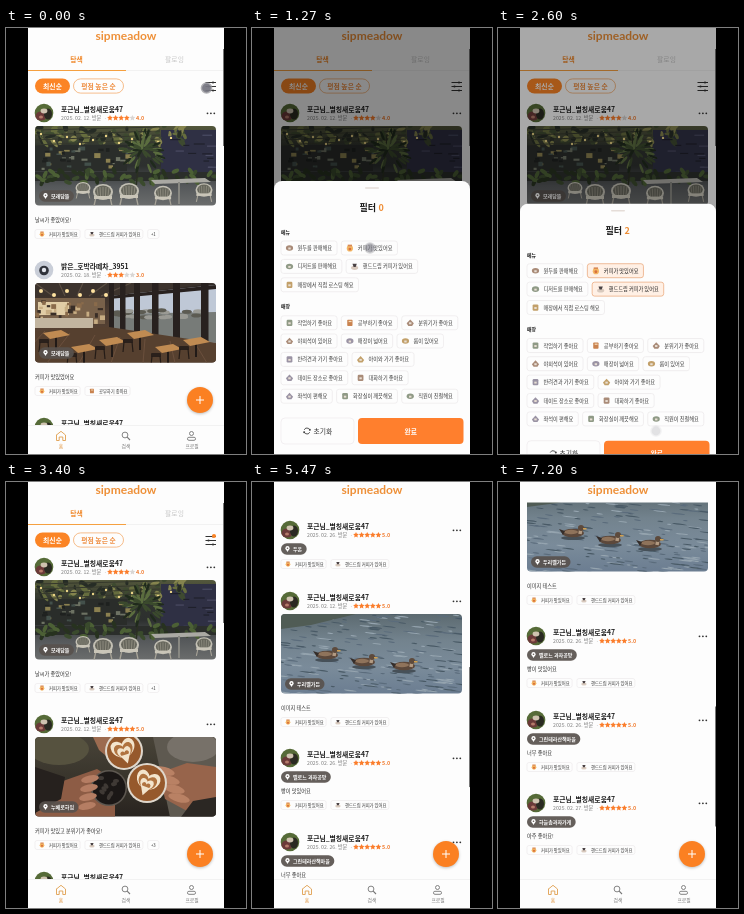
Recreate the animation shown at these times as an HTML page with a canvas. Size 240 by 426 pixels, loop 7270 ms.

```html
<!DOCTYPE html>
<html lang="ko">
<head>
<meta charset="utf-8">
<title>Cafe feed</title>
<style>
html, body { margin: 0; width: 100%; height: 100%; overflow: hidden; background: #000; }
canvas { display: block; width: 240px; height: 426px; }
</style>
</head>
<body>
<canvas id="stage"></canvas>
<script>
const W = 240, H = 426, LOOP = 7270;
const canvas = document.getElementById('stage');
const c = canvas.getContext('2d');
const dpr = window.devicePixelRatio || 1;
canvas.width = W * dpr;
canvas.height = H * dpr;

const FONT = '"Noto Sans CJK KR", "Noto Sans CJK", "Noto Sans", sans-serif';
const ORANGE = '#fb8425', INK = '#1c1c1c', GRAY = '#7d7d7d', LINE = '#ebe8ea', PAPER = '#fdfdfd';

// ---------- helpers ----------
const clamp = (v) => Math.max(0, Math.min(1, v));
const ramp = (t, start, dur) => clamp((t - start) / dur);
const easeOut = (p) => 1 - Math.pow(1 - p, 3);
const easeIn = (p) => p * p;

function seeded(s) {
  return () => (s = (s * 16807) % 2147483647) / 2147483647;
}
function setFont(size, weight = 400, family = FONT) {
  c.font = `${weight} ${size}px ${family}`;
}
function text(str, x, y, size, color = INK, weight = 400, align = 'left') {
  setFont(size, weight);
  c.textAlign = align;
  c.fillStyle = color;
  c.fillText(str, x, y);
}
function measure(str, size, weight = 400) {
  setFont(size, weight);
  return c.measureText(str).width;
}
function rect(x, y, w, h, color) {
  c.fillStyle = color;
  c.fillRect(x, y, w, h);
}
function box(x, y, w, h, r, fill, stroke, lw = 0.7) {
  c.beginPath();
  c.roundRect(x, y, w, h, r);
  if (fill) { c.fillStyle = fill; c.fill(); }
  if (stroke) { c.strokeStyle = stroke; c.lineWidth = lw; c.stroke(); }
}
function oval(x, y, rx, ry, color, rot = 0) {
  c.beginPath();
  c.ellipse(x, y, rx, ry, rot, 0, 7);
  c.fillStyle = color;
  c.fill();
}
const dot = (x, y, r, color) => oval(x, y, r, r, color);
function path(points, color, lw) {
  c.beginPath();
  points.forEach(([x, y], i) => i ? c.lineTo(x, y) : c.moveTo(x, y));
  if (lw) { c.strokeStyle = color; c.lineWidth = lw; c.stroke(); }
  else { c.fillStyle = color; c.fill(); }
}
function shade(h, ...colors) {
  const g = c.createLinearGradient(0, 0, 0, h);
  colors.forEach((k, i) => g.addColorStop(i / (colors.length - 1), k));
  return g;
}
function star(x, y, r, color) {
  const pts = [];
  for (let i = 0; i < 10; i++) {
    const a = i * Math.PI / 5 - Math.PI / 2, k = i % 2 ? r * 0.48 : r;
    pts.push([x + k * Math.cos(a), y + k * Math.sin(a)]);
  }
  path(pts, color);
}

// ---------- photos, drawn in a 181 x 80 box ----------
function chair(x, y, s = 1) {
  c.save();
  c.translate(x, y);
  c.scale(s, s);
  path([[-7, 5], [-9, 14]], '#a8a498', 1.3);
  path([[7, 5], [9, 14]], '#a8a498', 1.3);
  oval(0, 0, 10, 8, '#c3c0b4');
  oval(0, -0.5, 8, 6, '#66665c');
  for (let i = -2; i < 3; i++) path([[i * 3, -5], [i * 2.4, 5]], '#9c9a8c', 0.7);
  rect(-9, 4, 18, 3, '#c9c5b8');
  c.restore();
}
function terrace() {
  rect(0, 0, 181, 80, shade(80, '#54583c', '#30342e', '#2d302f', '#55585a', '#6b6d6d'));
  rect(126, 4, 55, 46, '#2f3044');
  rect(0, 19, 92, 26, '#2a2d2a');
  const rnd = seeded(41);
  for (let i = 0; i < 80; i++) {
    oval(rnd() * 150, rnd() * 17, 2 + rnd() * 4, 1 + rnd() * 2,
      ['#666d3e', '#3e4a30', '#262c25', '#85844e'][i % 4], rnd() * 3);
  }
  for (let i = 0; i < 4; i++) path([[0, 4 + i * 5], [125, 1 + i * 4]], '#35382c', 1);
  for (let i = 0; i < 11; i++) dot(6 + i * 13, 8 + (i * 7) % 11, 1.2, '#ecd488');
  for (let i = 0; i < 40; i++) {
    rect(rnd() * 95, 20 + rnd() * 24, 2 + rnd() * 5, 1 + rnd() * 4, ['#6d7263', '#1e211f', '#8b8050', '#43504b'][i % 4]);
  }
  for (let i = 0; i < 14; i++) rect(128 + rnd() * 50, 8 + rnd() * 38, 3 + rnd() * 8, 1.2, i % 2 ? '#4a4b63' : '#1f202b');
  rect(0, 46, 181, 9, '#2b2e2b');
  for (let i = 0; i < 55; i++) oval(rnd() * 181, 44 + rnd() * 13, 4, 2, ['#4c6035', '#27321f', '#3a4a2d'][i % 3], rnd() * 3);
  path([[101, 62], [106, 8]], '#2b3022', 1.5);
  for (let i = 0; i < 46; i++) {
    const a = rnd() * 6.3, r = 4 + rnd() * 17;
    oval(107 + Math.cos(a) * r, 23 + Math.sin(a) * r, 5, 1.3, ['#5b6d3f', '#1f2a1c', '#3b4a2d'][i % 3], a);
  }
  path([[116, 54], [170, 52], [176, 56], [120, 58]], '#aaa9a3');
  rect(143, 56, 2, 22, '#888882');
  chair(48, 62, 0.75); chair(68, 66); chair(94, 65); chair(128, 67, 0.9); chair(169, 64, 0.85);
}
function hall() {
  rect(0, 0, 181, 80, shade(80, '#302a27', '#4a3b31', '#5a4333', '#3b2b22'));
  path([[0, 0], [181, 0], [72, 13], [0, 12]], '#3c332d');
  for (let i = 0; i < 5; i++) path([[i * 24, 0], [i * 12 + 18, 13]], '#5d5044', 1.1);
  rect(0, 15, 70, 26, '#78614a');
  rect(3, 19, 31, 13, '#e1cda6');
  const rnd = seeded(29);
  for (let i = 0; i < 34; i++) rect(rnd() * 66, 17 + rnd() * 20, 2 + rnd() * 4, 2 + rnd() * 3, ['#392e27', '#c7ad83', '#8a6b4b'][i % 3]);
  rect(0, 35, 58, 10, '#c2b5a0');
  for (let i = 0; i < 6; i++) dot(6 + i * 13, 8 + i % 2 * 4, 2, '#ffe3a0');
  path([[74, 13], [181, 2], [181, 60], [74, 46]], '#bfc8d6');
  path([[74, 31], [181, 29], [181, 60], [74, 46]], '#777b78');
  for (let i = 0; i < 24; i++) oval(80 + rnd() * 101, 27 + rnd() * 8, 5, 2, i % 2 ? '#5c5b52' : '#9a9a94');
  [74, 85, 99, 117, 138, 166].forEach((x, i) => rect(x, 0, 5 + i * 0.5, 62, '#28211f'));
  path([[74, 13], [181, 2], [181, 6], [74, 16]], '#28211f');
  path([[0, 80], [0, 48], [74, 44], [181, 60], [181, 80]], '#56402f');
  for (let i = 0; i < 7; i++) path([[10 + i * 25, 48 + i * 2], [i * 32 - 20, 80]], '#705340', 0.8);
  for (let i = 0; i < 6; i++) {
    const x = 8 + i * 28, y = 50 + (i * 2 % 3) * 7;
    rect(x + 12, y + 3, 2, 14, '#211a17');
    path([[x, y], [x + 18, y - 3], [x + 27, y + 2], [x + 7, y + 6]], '#c08b52');
    box(x - 4, y + 6, 10, 4, 1, '#2a201b');
    path([[x - 3, y + 9], [x - 4, y + 19]], '#241b17', 1.2);
    path([[x + 5, y + 9], [x + 6, y + 19]], '#241b17', 1.2);
  }
}
function latte(x, y, r, a) {
  dot(x, y, r, '#dfd7cc');
  dot(x, y, r - 2, '#96592c');
  c.save();
  c.translate(x, y);
  c.rotate(a);
  for (let i = 0; i < 4; i++) {
    const s = 12 - i * 2.6, oy = i * 2 - 1;
    const tone = i % 2 ? '#b07340' : '#f3e4cc';
    oval(-s * 0.4, oy - 2, s * 0.55, s * 0.75, tone, -0.5);
    oval(s * 0.4, oy - 2, s * 0.55, s * 0.75, tone, 0.5);
  }
  path([[-5, 4], [5, 4], [0, 13]], '#f3e4cc');
  c.restore();
}
function cups() {
  rect(0, 0, 181, 80, shade(80, '#484338', '#39352c', '#28231f'));
  path([[118, 0], [181, 0], [181, 80], [135, 80]], '#5e5950');
  oval(24, 12, 30, 16, '#56523f');
  oval(158, 10, 26, 15, '#777169');
  path([[0, 80], [4, 58], [28, 44], [62, 32], [80, 44], [80, 80]], '#8d5c45');
  path([[0, 30], [30, 40], [26, 62], [0, 76]], '#26211e');
  path([[58, 0], [76, 0], [100, 14], [82, 28], [64, 13]], '#9c6b50');
  path([[181, 30], [152, 26], [124, 36], [130, 62], [152, 74], [181, 62]], '#97644b');
  path([[181, 60], [158, 64], [146, 80], [181, 80]], '#2b2723');
  for (let i = 0; i < 4; i++) oval(129 + i * 5, 34 + i * 9, 11, 4, '#b98164', 0.25);
  latte(89, 14, 19, -0.3);
  latte(112, 46, 20, 0.35);
  dot(74, 51, 18, '#5e5851');
  dot(74, 51, 16.5, '#1b1716');
  for (let i = 0; i < 8; i++) oval(66 + i * 5 % 17, 41 + i * 8 % 21, 3, 2, '#3f3935', i);
  for (let i = 0; i < 4; i++) oval(55 - i, 42 + i * 9, 9, 3.6, '#b57d63', -0.2);
}
function bun(x, y, r) {
  oval(x, y + 2, r, r * 0.8, '#654231');
  oval(x, y - 1, r * 0.95, r * 0.74, '#96603b');
  oval(x - 3, y - 3, r * 0.42, r * 0.28, '#d2a477', 0.5);
  oval(x + 4, y + 1, r * 0.32, r * 0.25, '#7b4a30');
}
function bread() {
  rect(0, 0, 181, 80, shade(80, '#b7b0aa', '#aea7a0', '#a29a93'));
  path([[0, 0], [14, 0], [0, 48]], '#77726c');
  path([[160, 0], [181, 0], [181, 44], [170, 36]], '#2c2a2e');
  oval(56, 80, 39, 25, '#7d7671');
  oval(55, 78, 37, 24, '#cec8c1');
  oval(55, 79, 29, 18, '#bdb6ae');
  oval(122, 40, 46, 38, '#76706b');
  oval(121, 37, 45, 37, '#d9d4cd');
  oval(121, 37, 34, 27, '#c9c2bb');
  bun(97, 13, 13);
  bun(125, 13, 12);
  bun(139, 43, 15);
  oval(106, 44, 21, 15, '#80604d');
  oval(106, 41, 20, 14, '#dccabd');
  const rnd = seeded(17);
  for (let i = 0; i < 16; i++) dot(92 + rnd() * 28, 34 + rnd() * 15, 1.1, '#a07564');
  bun(53, 66, 14);
  dot(178, 56, 11, '#e6e1dc');
  dot(179, 56, 7, '#7f6656');
}
function duck(x, y) {
  oval(x, y + 5, 12, 2, '#465058');
  oval(x, y, 11, 4.3, '#5c483b');
  oval(x - 2, y - 1, 7, 2.2, '#8f735b');
  path([[x - 8, y - 2], [x - 14, y - 4], [x - 10, y + 2]], '#352d29');
  path([[x + 7, y + 1], [x + 8, y - 5]], '#b29a82', 3.5);
  dot(x + 8, y - 5, 3, '#5d4a3c');
  rect(x + 10, y - 5, 3.5, 1.5, '#d0a050');
}
function pond() {
  rect(0, 0, 181, 80, shade(80, '#5c6a70', '#73838e', '#7a8b9a', '#6b7d91'));
  const rnd = seeded(73);
  for (let i = 0; i < 240; i++) {
    oval(rnd() * 181, rnd() * 80, 2 + rnd() * 6, 0.6, ['#495a66', '#95a4af', '#5b6c7c'][i % 3], 0.12);
  }
  path([[0, 0], [75, 0], [30, 11], [0, 15]], '#505c55');
  duck(46, 41); duck(83, 48); duck(123, 52);
}

// ---------- data ----------
const NAME = '포근님_별칭새로움47';
const COFFEE = '커피가 맛있어요', DRIP = '핸드드립 커피가 있어요', STUDY = '공부하기 좋아요';
function post(y, day, place, note, photo, tags, extra = {}) {
  return { y, day, place, note, photo, tags, name: NAME, score: 5, menu: true, ...extra };
}
const first = post(81, '12', '모래담뜰', '날씨가 좋았어요!', terrace, [COFFEE, DRIP, '+1'], { score: 4 });
const third = post(395, '19', '오린상점', '테스트', bread, [DRIP, COFFEE, '+3']);
const allPosts = [
  first,
  post(238, '18', '모래담뜰', '커피가 맛있었어요', hall, [COFFEE, STUDY],
    { name: '밝은_호박라떼차_3951', score: 3, menu: false, pale: true }),
  third
];
const filtered = [
  first,
  post(238, '12', '누베로하임', '커피가 맛있고 분위기가 좋아요!', cups, [COFFEE, DRIP, '+3']),
  third,
  post(552, '26', '두온', '', null, [COFFEE, DRIP]),
  post(623, '12', '두리벨가든', '이미지 테스트', pond, [COFFEE, DRIP]),
  post(780, '26', '벨로느 과자공방', '빵이 맛있어요', null, [COFFEE, DRIP]),
  post(864, '26', '그린테라산책마을', '너무 좋아요', null, [COFFEE, DRIP]),
  post(947, '27', '하늘솜과자가게', '아주 좋아요!', null, [COFFEE, DRIP])
];
const options = [
  [67, ['원두를 판매해요', COFFEE]],
  [85.4, ['디저트를 판매해요', DRIP]],
  [103.8, ['매장에서 직접 로스팅 해요']],
  [141.8, ['작업하기 좋아요', STUDY, '분위기가 좋아요']],
  [160, ['야외석이 있어요', '매장이 넓어요', '룸이 있어요']],
  [178.4, ['반려견과 가기 좋아요', '아이와 가기 좋아요']],
  [196.8, ['데이트 장소로 좋아요', '대화하기 좋아요']],
  [215.2, ['좌석이 편해요', '화장실이 깨끗해요', '직원이 친절해요']]
];
const PICK = { [COFFEE]: 1330, [DRIP]: 1680 };

// ---------- feed ----------
function icon(label, x, y, s) {
  c.save();
  c.translate(x, y);
  c.scale(s, s);
  if (label === COFFEE) {
    dot(0, 0.4, 2.6, '#f3b765');
    rect(-1.8, -2.8, 3.6, 1.4, '#d98a54');
    dot(0, 0.9, 1.2, '#d9703c');
  } else if (label === DRIP) {
    oval(0, 1.2, 3, 1.7, '#d8c9bd');
    path([[-1.8, -2.2], [1.8, -2.2], [0.9, 0.4], [-0.9, 0.4]], '#4a4244');
  } else if (label === STUDY) {
    box(-2.2, -2.6, 4.4, 5.2, 0.6, '#c98350');
    rect(-1, -1.6, 2.4, 1, '#f6dcb8');
  } else {
    const k = label.length + label.charCodeAt(0);
    const tint = ['#a98b78', '#8f9a86', '#c2a06a', '#9a93a4'][k % 4];
    if (k % 3 === 0) oval(0, 0, 3, 2.3, tint);
    else if (k % 3 === 1) box(-2.4, -2.6, 4.8, 5.2, 1, tint);
    else path([[-3, 0.4], [0, -2.8], [3, 0.4], [1.6, 2.6], [-1.6, 2.6]], tint);
    rect(-1, -0.4, 2, 1.6, '#e9dfd4');
  }
  c.restore();
}
function tagRow(tags, y) {
  let x = 29;
  for (const tag of tags) {
    const more = tag[0] === '+', w = measure(tag, 4.3, 500) + (more ? 6.5 : 16.5);
    box(x, y - 4.5, w, 9, 2, PAPER, LINE, 0.6);
    if (!more) icon(tag, x + 7, y, 0.9);
    text(tag, x + (more ? 3.2 : 14), y, 4.3, '#333', 500);
    x += w + 4.8;
  }
}
function placePill(place, x, y) {
  const w = measure(place, 5, 700) + 16.5;
  box(x, y - 5.8, w, 11.6, 5.8, 'rgba(88,82,78,.92)');
  dot(x + 6.5, y - 0.8, 2.1, '#fff');
  path([[x + 4.7, y], [x + 8.3, y], [x + 6.5, y + 3]], '#fff');
  dot(x + 6.5, y - 0.8, 0.8, '#665d57');
  text(place, x + 12, y, 5, '#fff', 700);
}
function avatar(y, pale) {
  dot(38, y, 9.3, pale ? '#c9ced8' : '#566b38');
  if (pale) {
    dot(38, y + 0.5, 4.8, '#2f323a');
    dot(38, y, 2.2, '#e2e5ec');
    return;
  }
  oval(35, y + 3, 5.5, 4.5, '#6b3a39');
  oval(42, y + 1, 4, 5.5, '#2a2a22');
  oval(38, y - 2, 3.4, 2.4, '#cfc3b0');
  oval(35, y + 4, 2, 1.6, '#b57a6a');
}
function drawPost(p) {
  const y = p.y;
  avatar(y + 4, p.pale);
  text(p.name, 55, y, 6.8, INK, 700);
  text(`2025. 02. ${p.day}. 방문  ·`, 55, y + 9, 5.2, GRAY);
  for (let i = 0; i < 5; i++) star(104 + i * 5.6, y + 9, 3, i < p.score ? '#fb7d2b' : '#d9d6d4');
  text(p.score.toFixed(1), 130, y + 9, 5.4, '#f0782a', 700);
  if (p.menu) for (let i = 0; i < 3; i++) dot(201.5 + i * 3.4, y + 4.3, 0.9, '#333');
  let base = y + 37;
  if (p.photo) {
    c.save();
    c.translate(29, y + 17);
    c.beginPath();
    c.roundRect(0, 0, 181, 79.5, 4);
    c.clip();
    p.photo();
    c.restore();
    placePill(p.place, 33, y + 87);
    base = y + 111;
  } else {
    placePill(p.place, 29, y + 23);
  }
  if (p.note) text(p.note, 29, base, 5.2, '#333', 500);
  tagRow(p.tags, p.note ? base + 14 : y + 38);
}
function controls(active) {
  text('탐색', 70.5, 31, 6.8, '#f08a2e', 700, 'center');
  text('팔로잉', 168.5, 31, 6.8, '#c6c6c6', 400, 'center');
  rect(22, 42, 196, 0.7, '#eee');
  rect(22, 42, 98, 1, '#f5a040');
  box(29, 50.5, 35, 15, 7.5, ORANGE);
  text('최신순', 46.5, 58, 6.8, '#fff', 700, 'center');
  box(67.5, 50.9, 50, 14.2, 7.1, PAPER, '#f2a35c');
  text('평점 높은 순', 92.5, 58, 6.8, '#ee8d40', 700, 'center');
  for (let i = 0; i < 3; i++) {
    rect(199.5, 54 + i * 4, 10.5, 1, '#333');
    dot(i % 2 ? 202.5 : 207, 54.5 + i * 4, 1.1, '#333');
  }
  if (active) dot(208, 54, 2, ORANGE);
}
function navBar() {
  rect(22, 397, 196, 29, PAPER);
  rect(22, 397, 196, 0.6, '#ececec');
  path([[50.5, 407], [55, 403.3], [59.5, 407], [59.5, 412.5], [56.8, 412.5], [56.8, 409], [53.2, 409],
    [53.2, 412.5], [50.5, 412.5], [50.5, 406.6]], '#e0a050', 0.9);
  c.strokeStyle = '#777';
  c.lineWidth = 0.9;
  c.beginPath();
  c.arc(119, 407, 2.9, 0, 7);
  c.stroke();
  path([[121.2, 409.2], [124, 412]], '#777', 1.1);
  c.strokeStyle = '#777';
  c.lineWidth = 0.9;
  c.beginPath();
  c.arc(185.5, 405.5, 2, 0, 7);
  c.stroke();
  box(181.5, 409.3, 8, 3, 1.4, null, '#777', 0.9);
  text('홈', 55, 418.5, 4.8, '#e0943d', 500, 'center');
  text('검색', 120, 418.5, 4.8, '#777', 400, 'center');
  text('프로필', 186, 418.5, 4.8, '#777', 400, 'center');
}
function feed(t, scroll) {
  const active = t >= 2950;
  rect(22, 0, 196, H, PAPER);
  c.save();
  c.translate(0, -scroll);
  controls(active);
  for (const p of active ? filtered : allPosts) {
    if (p.y - scroll < 410 && p.y - scroll > -150) drawPost(p);
  }
  c.restore();
  rect(22, 0, 196, 20.5, PAPER);
  setFont(12, 700, 'Lato, "Open Sans", sans-serif');
  c.textAlign = 'center';
  c.fillStyle = '#ee9038';
  c.fillText('sipmeadow', 120, 8.5);
  rect(217, 21 + scroll * 0.323, 1, active ? 120 : 97, '#777');
  c.save();
  c.shadowColor = 'rgba(0,0,0,.25)';
  c.shadowBlur = 3 * dpr;
  c.shadowOffsetY = dpr;
  dot(194, 372, 13, '#fb8022');
  c.restore();
  rect(190, 371.5, 8, 1, '#fff');
  rect(193.5, 368, 1, 8, '#fff');
  navBar();
}

// ---------- filter sheet ----------
function sheet(t, top) {
  c.save();
  c.translate(0, top);
  box(22, 0, 196, 290, [8, 8, 0, 0], PAPER);
  box(113, 6.3, 14, 1.4, 0.7, '#e5ddd8');
  const count = Object.values(PICK).filter((at) => t >= at).length;
  text('필터', 107.5, 27, 9, INK, 700);
  text(String(count), 126.5, 27, 9, '#ee8d35', 700);
  text('메뉴', 29, 51, 4.9, INK, 700);
  text('매장', 29, 125.3, 4.9, INK, 700);
  for (const [y, labels] of options) {
    let x = 29;
    for (const label of labels) {
      const on = t >= PICK[label], w = measure(label, 5.2, 500) + 21.5;
      box(x, y - 7, w, 14, 2.5, on ? '#fff0e5' : PAPER, on ? '#e8a273' : LINE);
      icon(label, x + 8.5, y, 1.2);
      text(label, x + 16.5, y, 5.2, on ? '#222' : '#3c3c3c', 500);
      x += w + 4.3;
    }
  }
  box(29, 237, 73, 26, 4, PAPER, '#eeeaec');
  c.strokeStyle = '#444';
  c.lineWidth = 0.9;
  for (let i = 0; i < 2; i++) {
    c.beginPath();
    c.arc(55, 250, 3, 0.4 + i * Math.PI, 2.9 + i * Math.PI);
    c.stroke();
    dot(55 + (i ? 2.8 : -2.8), 250 + (i ? -1.2 : 1.2), 1, '#444');
  }
  text('초기화', 61.5, 250, 6.8, '#333', 500);
  box(106, 237, 105.5, 26, 4, '#ff7f2d');
  text('완료', 158.7, 250, 6.8, '#fff', 700, 'center');
  c.restore();
}

// ---------- motion ----------
const swipes = [
  { at: 3560, from: 0, to: 296, dur: 850, y: 330 },
  { at: 4470, from: 296, to: 508, dur: 900, y: 245 },
  { at: 5650, from: 508, to: 630, dur: 800, y: 260 }
];
const taps = [[-100, 200.5, 60], [1250, 118, 220], [1600, 130, 238], [2350, 158, 403]];

function scrollAt(t) {
  return swipes.reduce((s, w) => s + (w.to - w.from) * easeOut(ramp(t, w.at, w.dur)), 0);
}
function touch(x, y, alpha) {
  c.globalAlpha = alpha;
  dot(x, y, 5.8, 'rgba(150,150,155,.75)');
  dot(x, y, 4.4, 'rgba(110,110,122,.75)');
  c.globalAlpha = 1;
}
function fingers(t, scroll) {
  for (const [at, x, y] of taps) {
    const age = t - at;
    if (age >= 0 && age < 260) touch(x, y, Math.min(1, age / 40, (260 - age) / 60));
  }
  for (const w of swipes) {
    const age = t - w.at;
    if (age > -80 && age < 190) touch(146, w.y - (scroll - w.from), Math.min(1, (age + 80) / 40, (190 - age) / 50));
  }
}
function draw(now) {
  const t = now % LOOP, scroll = scrollAt(t);
  c.setTransform(dpr, 0, 0, dpr, 0, 0);
  c.textBaseline = 'middle';
  rect(0, 0, W, H, '#000');
  c.save();
  c.beginPath();
  c.rect(22, 0, 196, H);
  c.clip();
  feed(t, scroll);
  const open = easeOut(ramp(t, 620, 500)) - easeIn(ramp(t, 2500, 350));
  const dim = ramp(t, 600, 130) - ramp(t, 2520, 300);
  if (dim > 0) rect(22, 0, 196, H, `rgba(0,0,0,${0.46 * dim})`);
  if (open > 0) sheet(t, 426 - 273 * open);
  fingers(t, scroll);
  c.restore();
}
const start = performance.now();
function tick() {
  draw(performance.now() - start);
  requestAnimationFrame(tick);
}
tick();
</script>
</body>
</html>
```
